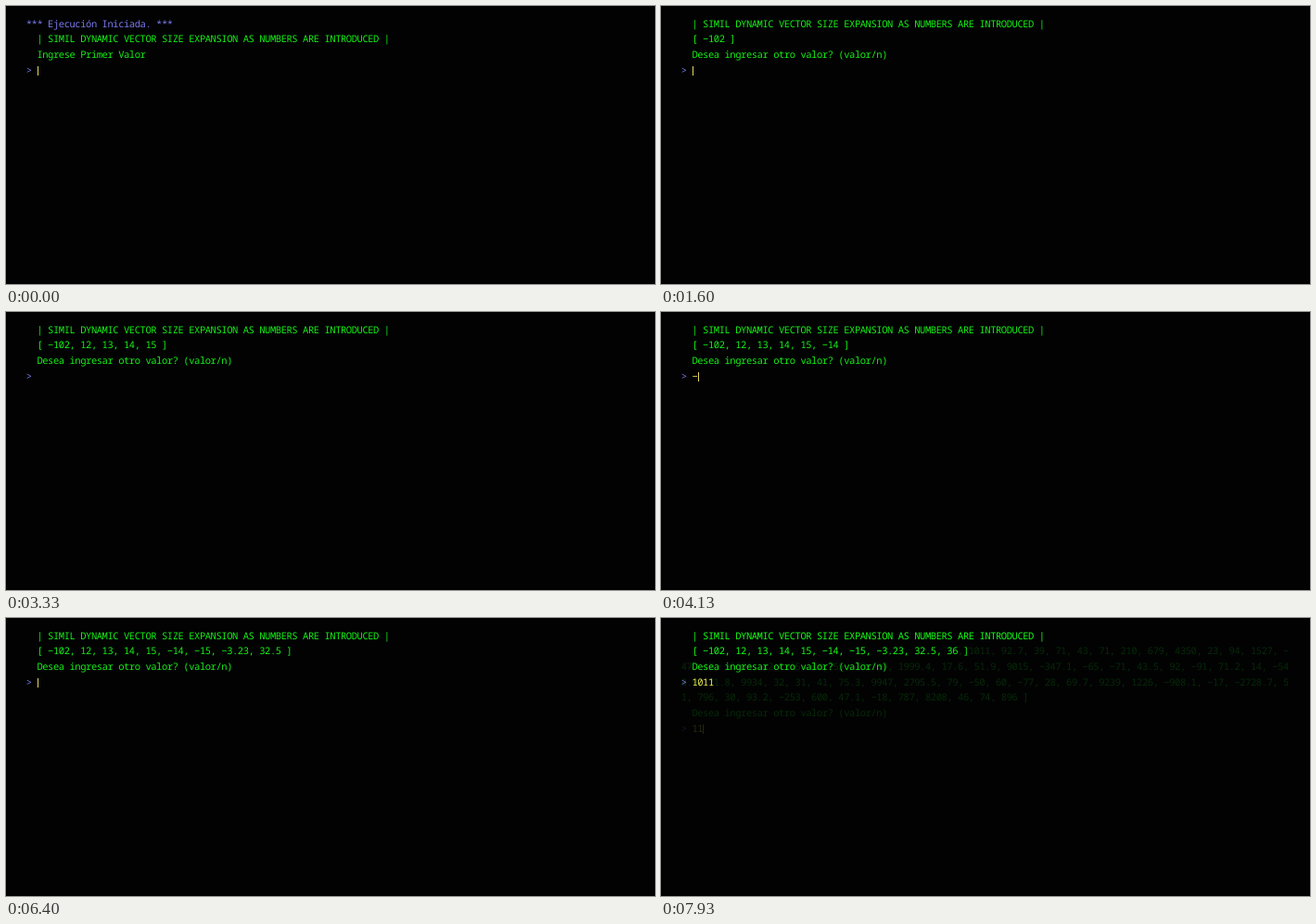
Write an HTML page that moves like this. It is 700 px wide and 300 px high and loops after 8000 ms.

```html
<!DOCTYPE html>
<html lang="es">
<head>
<meta charset="utf-8">
<title>Terminal</title>
<style>
  html, body {
    margin: 0;
    width: 100%;
    height: 100%;
    overflow: hidden;
    background: #020203;
  }
  .screen {
    --col: 5.85px;
    --row: 16.7px;
    position: absolute;
    left: 21.7px;
    top: 11.6px;
    font: 500 10.5px/var(--row) "Noto Sans Mono", "DejaVu Sans Mono", monospace;
    letter-spacing: calc(var(--col) - .6em);
    font-variant-ligatures: none;
    text-rendering: geometricPrecision;
    white-space: pre;
    color: #16f016;
  }
  .sys { color: #7a7aee; }
  .in { color: #ecec50; }
  .caret {
    position: absolute;
    left: calc(var(--x) * var(--col) + .3px);
    top: calc(var(--y) * var(--row) + 3.4px);
    width: 1px;
    height: 10px;
    background: #e8d860;
  }
  #next { opacity: .16; visibility: hidden; }
</style>
</head>
<body>
<div class="screen" id="next"></div>
<div class="screen" id="main"></div>
<script>
const LOOP = 8000;
const FPS = 15;
const KEY = 100;     // ms between key presses
const BLINK = 250;   // ms between caret toggles
const FADE = 7930;
const COLS = 112;
const TITLE = '  | SIMIL DYNAMIC VECTOR SIZE EXPANSION AS NUMBERS ARE INTRODUCED |';
const ASK = '  Desea ingresar otro valor? (valor/n)';

// value, time of the first key, time of Enter
const entries = [
  ['-102', 930, 1600],
  ['12', 2260, 2400],
  ['13', 2600, 2730],
  ['14', 2800, 2930],
  ['15', 3000, 3130],
  ['-14', 3600, 3930],
  ['-15', 4130, 4400],
  ['-3.23', 4660, 5330],
  ['32.5', 5600, 6400],
  ['36', 6600, 6860],
  ['1011', 7530, Infinity]
];

const main = document.getElementById('main');
const next = document.getElementById('next');

const minus = s => s.replace(/-/g, '\u2212');
const span = (cls, s) => `<span class="${cls}">${s}</span>`;
const prompt = s => span('sys', '&gt;') + ' ' + span('in', minus(s));
const caret = (x, y) => `<i class="caret" style="--x:${x};--y:${y}"></i>`;
const page = (lines, mark) => lines.join('\n') + mark;

// Frame on screen at a time in ms; frames start on whole hundredths of a second
const frameAt = ms => Math.ceil((Math.floor(ms / 10) + 1) * FPS / 100) - 1;
// Caret toggles up to a frame, each on the frame nearest to it
const blinks = n => Math.ceil(((n + .5) * 1000 / FPS - 200) / BLINK);

function draw(n) {
  const done = entries.filter(e => frameAt(e[2]) <= n);
  const [value, first] = entries[done.length];
  const pressed = Math.floor((n - frameAt(first) + 1) / (KEY * FPS / 1000) + .4);
  const typed = value.slice(0, Math.max(0, pressed));
  const since = done.length ? frameAt(done[done.length - 1][2]) : 0;
  const lit = (blinks(n) - blinks(since)) % 2 === 0;
  const list = done.map(e => e[0]).join(', ');
  const head = done.length
    ? [TITLE, minus(`  [ ${list} ]`), ASK]
    : [span('sys', '*** Ejecución Iniciada. ***'), TITLE, '  Ingrese Primer Valor'];
  main.innerHTML = page([...head, prompt(typed)], lit ? caret(2 + typed.length, 3) : '');
  next.style.visibility = n >= frameAt(FADE) ? 'visible' : 'hidden';
}

// The later screen: a long list wrapped at the terminal width
let seed = 7;
const rand = () => (seed = seed * 16807 % 2147483647) / 2147483647;

function randomValue() {
  const digits = 2 + Math.floor(rand() ** 2 * 3);
  const whole = Math.floor((.1 + rand() * .9) * 10 ** digits);
  const sign = rand() < .25 ? '-' : '';
  const part = rand() < .25 ? '.' + Math.ceil(rand() * 9) : '';
  return sign + whole + part;
}

function laterScreen() {
  let list = '  [ ' + entries.map(e => e[0]).join(', ');
  while (list.length < COLS * 3 + 62) list += ', ' + randomValue();
  const rows = minus(list + ' ]').match(new RegExp(`.{1,${COLS}}`, 'g'));
  const typed = '11';
  return page([TITLE, ...rows, ASK, prompt(typed)], caret(2 + typed.length, rows.length + 2));
}

next.innerHTML = laterScreen();

const start = performance.now();
let shown = -1;

function step() {
  const n = frameAt((performance.now() - start) % LOOP);
  if (n !== shown) draw(shown = n);
  requestAnimationFrame(step);
}
step();
</script>
</body>
</html>
```
